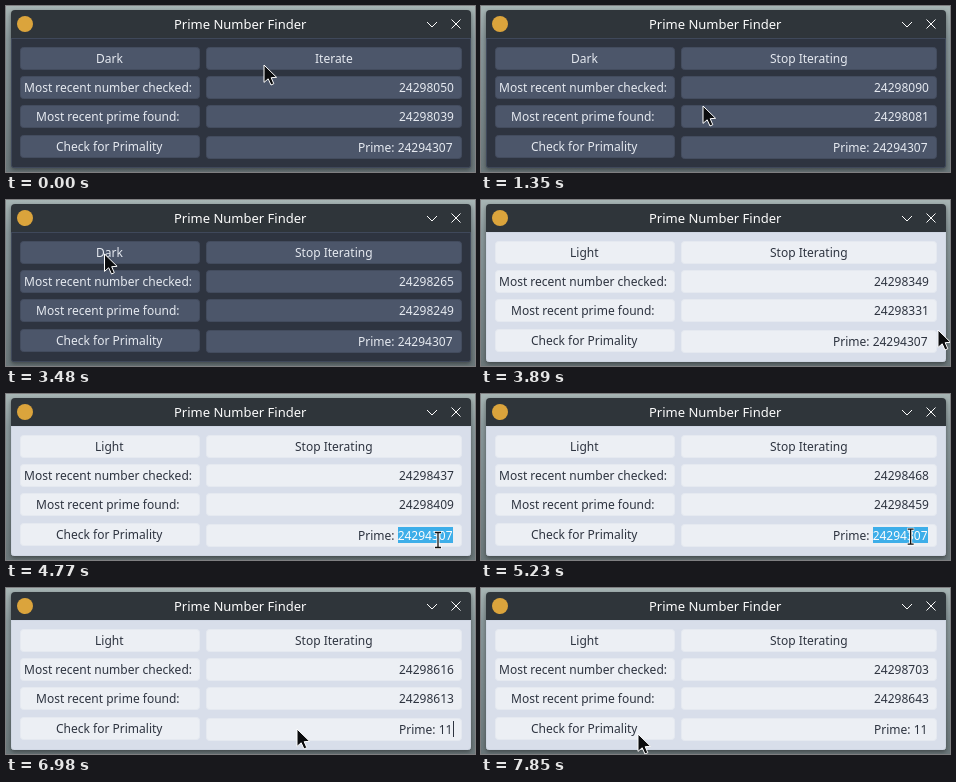
These frames come from a looping animation (469 by 166 pixels, 8 s). An HTML page:

```html
<!DOCTYPE html>
<html lang="en">
<head>
<meta charset="utf-8">
<title>Prime Number Finder</title>
<style>
  html, body { margin: 0; width: 100%; height: 100%; overflow: hidden; background: #89979a; }
  svg { display: block; width: 469px; height: 166px; font: 12px "Noto Sans", sans-serif; }
  text { white-space: pre; }
  #app { --body: #2e3440; --line: #3f485a; --box: #4c566a; --edge: #434c5e; --ink: #e5e9f0; }
  #app.light { --body: #d8deea; --line: #d0d7e4; --box: #eceff4; --edge: #e5e9f0; --ink: #2e3440; }
  #window { filter: drop-shadow(0 2px 2px #0006); }
  .body { fill: var(--body); stroke: var(--line); }
  .box { fill: var(--box); stroke: var(--edge); }
  #rows text { fill: var(--ink); }
  #rows .picked { fill: #fcfcfc; }
  .icon { fill: none; stroke: #fcfcfc; }
</style>
</head>
<body>
<svg id="app" viewBox="0 0 469 166">
  <defs>
    <linearGradient id="desk" x2="0" y2="1">
      <stop stop-color="#a7b5b4"/>
      <stop offset=".2" stop-color="#89979a"/>
      <stop offset="1" stop-color="#6b777a"/>
    </linearGradient>
  </defs>
  <rect width="469" height="166" fill="url(#desk)"/>
  <g id="window">
    <rect class="body" x="5.5" y="30.5" width="459" height="131" rx="2"/>
    <path d="M5 32V8q0-4 4-4H461q4 0 4 4V32z" fill="#2f353a"/>
    <path d="M5 32.5H465" stroke="var(--line)"/>
  </g>
  <circle cx="19" cy="18" r="8" fill="#dba43c"/>
  <text id="title" y="23" font-size="13" fill="#fcfcfc"></text>
  <path class="icon" d="M421 16l5 5 5-5M445.5 13.5l9 9m0-9l-9 9"/>
  <g id="rows"></g>
  <rect id="caret" x="447" y="133" width="1" height="16" fill="#2e3440"/>
  <path id="arrow" d="M0 0V17.4L4.2 13.8 7 20 9.8 18.7 7.2 12.7 12.6 12.3z"
    fill="#0b0c0e" stroke="#fff" stroke-linejoin="round"/>
  <g id="beam" fill="none">
    <path d="M-3.5-7.5H3.5M0-7.5V7.5M-3.5 7.5H3.5" stroke="#fff" stroke-width="3"/>
    <path d="M-3-7.5H3M0-7.5V7.5M-3 7.5H3" stroke="#111" stroke-width="1.3"/>
  </g>
</svg>
<script>
const LOOP = 8000, FIRST = 1280, BEAT = 435, BASE = 24298000;
const $ = id => document.getElementById(id);

// beat, pointer x, pointer y, number checked
const keys = [
  [0, 258, 59, 50],
  [1, 222, 100, 90],
  [4, 208, 104, 195],
  [6, 98.5, 54, 265],
  [7, 457, 130, 349],
  [9, 432, 146, 437],
  [12, 425, 136, 529],
  [16, 157, 146, 703]
];

function stateAt(beat) {
  const i = keys.findIndex(k => k[0] >= beat);
  const to = keys[i], from = keys[i - 1] || to;
  const p = (beat - from[0]) / (to[0] - from[0] || 1);
  return from.map((v, j) => v + (to[j] - v) * p);
}

function lastPrime(n) {
  for (let d = 2; d * d <= n; d++) if (n % d === 0) return lastPrime(n - 1);
  return n;
}

// Text starts on a whole pixel; align is 0.5 for centred, 1 for right.
function put(id, markup, x, align) {
  const el = $(id);
  el.innerHTML = markup;
  el.setAttribute("x", Math.floor(x - el.getComputedTextLength() * align));
}
const show = (id, on) => $(id).setAttribute("visibility", on ? "visible" : "hidden");

const box = (x, y, w) =>
  `<rect class="box" x="${x + .5}" y="${y + .5}" width="${w - 1}" height="22" rx="3"/>`;
$("rows").innerHTML = [41, 70, 99, 129].map((y, i) => {
  const right = i === 3 ? y + 1 : y; // the editable field sits one pixel lower
  return box(14, y, 180) + box(200, right, 256) +
    (i === 3 ? '<rect id="pick" x="392" y="133" width="55" height="16" fill="#3daee9"/>' : "") +
    `<text id="left${i}" y="${y + 16}"></text><text id="right${i}" y="${right + 16}"></text>`;
}).join("");

function draw(beat) {
  const [, x, y, checked] = stateAt(beat);
  const n = BASE + Math.round(checked);
  const between = (a, b) => beat >= a && beat < b;
  const light = beat >= 7;
  const picked = between(9, 11);
  const beam = between(8, 14);
  const entry = beat < 11 ? "24294307" : "11".slice(0, beat - 11);

  $("app").classList.toggle("light", light);
  put("title", "Prime Number Finder", 235, .5);
  put("left0", light ? "Light" : "Dark", 104, .5);
  put("left1", "Most recent number checked:\u00a0", 104, .5);
  put("left2", "Most recent prime found:\u00a0", 104, .5);
  put("left3", "Check for Primality", 104, .5);
  put("right0", beat ? "Stop Iterating" : "Iterate", 328, .5);
  put("right1", n, 448, 1);
  put("right2", lastPrime(n), 448, 1);
  put("right3", `Prime: <tspan class="${picked ? "picked" : ""}">${entry}</tspan>`, 447, 1);
  show("pick", picked);
  show("caret", between(11, 15));
  show("arrow", !beam);
  show("beam", beam);
  $(beam ? "beam" : "arrow").setAttribute("transform", `translate(${x} ${y})`);
}

let current;
function tick() {
  const t = performance.now() % LOOP;
  const beat = Math.max(0, Math.floor((t - FIRST) / BEAT) + 1);
  if (beat !== current) draw(current = beat);
  requestAnimationFrame(tick);
}
tick();
</script>
</body>
</html>
```
